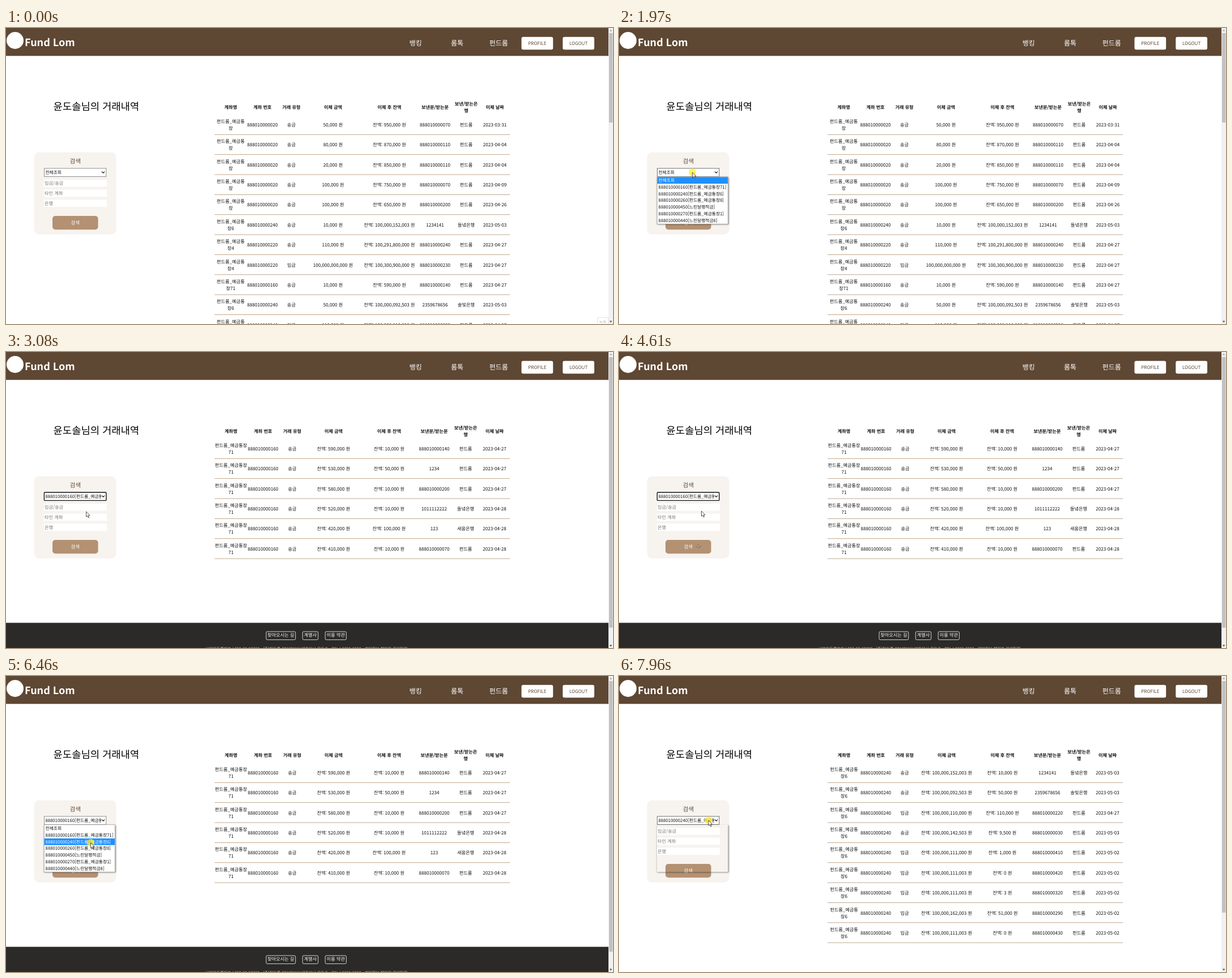
Write an HTML page that moves like this. It is 1071x523 px and loops after 7990 ms.

```html
<!DOCTYPE html>
<html lang="ko">
<head>
<meta charset="utf-8">
<title>거래내역</title>
<style>
html, body { margin: 0; width: 100%; height: 100%; overflow: hidden; background: #fff; }
svg { display: block; width: 100%; height: 100%; }
text { font: 8.15px "Noto Sans CJK KR", "Noto Sans CJK", "Noto Sans", sans-serif; text-rendering: geometricPrecision; white-space: pre; }
</style>
</head>
<body>
<svg id="stage" viewBox="0 0 1071 523" xmlns="http://www.w3.org/2000/svg"></svg>
<script>
const LOOP = 7990;
const BROWN = '#5e4733', TAN = '#b39172';
const BRAND = '펀드롬', SAVINGS = '느린달팽적금';

// ---------- markup helpers ----------
const text = (x, y, s, { size = 8.15, fill = '#111', anchor = 'middle', weight = 400, more = '' } = {}) =>
  `<text x="${x}" y="${y}" text-anchor="${anchor}" fill="${fill}" style="font-size:${size}px;font-weight:${weight}" ${more}>${s}</text>`;
const rect = (x, y, w, h, fill, more = '') =>
  `<rect x="${x}" y="${y}" width="${w}" height="${h}" fill="${fill}" ${more}/>`;
const group = (id, body, more = '') => `<g id="${id}" ${more}>${body}</g>`;

// ---------- tables ----------
const HEADS = ['계좌명', '계좌 번호', '거래 유형', '이체 금액', '이체 후 잔액', '보낸분/받는분', '', '이체 날짜'];
const PITCH = 35.36;
const account = s => s.replace('@', '888010000');
const bank = s => s === '-' ? BRAND : s + '은행';

// Row: name ending, account, type, two amounts, other account, bank, date
const TABLES = [
  { cols: [396.5, 452.5, 503.5, 577, 676.5, 757, 812, 862.5], name: '_예금통', prefix: '', thumb: 158, rows: [
    '장 @020 송금 50,000 950,000 @070 - 03-31',
    '장 @020 송금 80,000 870,000 @110 - 04-04',
    '장 @020 송금 20,000 850,000 @110 - 04-04',
    '장 @020 송금 100,000 750,000 @070 - 04-09',
    '장 @020 송금 100,000 650,000 @200 - 04-26',
    '장6 @240 송금 10,000 100,000,152,003 1234141 들녘 05-03',
    '장4 @220 송금 110,000 100,291,800,000 @240 - 04-27',
    '장4 @220 입금 100,000,000,000 100,300,900,000 @230 - 04-27',
    '장71 @160 송금 10,000 590,000 @140 - 04-27',
    '장6 @240 송금 50,000 100,000,092,503 2359678656 솔빛 05-03',
    '장6 @240 입금 110,000 100,000,110,000 @220 - 04-27'] },
  { cols: [397, 453.5, 505, 578, 676, 755.5, 811, 862], name: '_예금통장', prefix: '잔액: ', thumb: 478, rows: [
    '71 @160 송금 590,000 10,000 @140 - 04-27',
    '71 @160 송금 530,000 50,000 1234 - 04-27',
    '71 @160 송금 580,000 10,000 @200 - 04-27',
    '71 @160 송금 520,000 10,000 1011112222 들녘 04-28',
    '71 @160 송금 420,000 100,000 123 새움 04-28',
    '71 @160 송금 410,000 10,000 @070 - 04-28'] },
  { cols: [397, 453, 504, 578, 676.5, 756, 811.5, 862], name: '_예금통', prefix: '잔액: ', thumb: 409, rows: [
    '장6 @240 송금 100,000,152,003 10,000 1234141 들녘 05-03',
    '장6 @240 송금 100,000,092,503 50,000 2359678656 솔빛 05-03',
    '장6 @240 입금 100,000,110,000 110,000 @220 - 04-27',
    '장6 @240 송금 100,000,142,503 9,500 @030 - 05-03',
    '장6 @240 입금 100,000,111,000 1,000 @410 - 05-02',
    '장6 @240 입금 100,000,111,003 0 @420 - 05-02',
    '장6 @240 입금 100,000,111,003 3 @320 - 05-02',
    '장6 @240 입금 100,000,162,003 51,000 @290 - 05-02',
    '장6 @240 입금 100,000,111,003 0 @430 - 05-02'] }
];

function tableMarkup({ cols, name, prefix, rows }) {
  const bold = { weight: 700 };
  const head = HEADS.map((h, i) => text(cols[i], 142.5, h, bold)).join('')
    + text(cols[6], 136.7, '보낸/받는은', bold) + text(cols[6], 148.7, '행', bold);
  return head + rows.map((row, i) => {
    const [end, own, type, first, second, other, bankName, date] = row.split(' ');
    const y = 174 + i * PITCH;
    const cells = ['', account(own), type, `${prefix}${first} 원`, `잔액: ${second} 원`,
      account(other), bank(bankName), '2023-' + date];
    return text(cols[0], y - 6, BRAND + name) + text(cols[0], y + 6, end)
      + cells.map((c, k) => c && text(cols[k], y, c)).join('')
      + rect(368, 187.9 + i * PITCH, 521, 0.8, TAN);
  }).join('');
}

// ---------- page parts ----------
const OPTIONS = ['전체조회', `888010000160[${BRAND}_예금통장71]`, `888010000240[${BRAND}_예금통장6]`,
  `888010000260[${BRAND}_예금통장8]`, `888010000450[${SAVINGS}]`,
  `888010000270[${BRAND}_예금통장1]`, `888010000440[${SAVINGS}8]`];
const MENU_TOP = 263.3, OPTION_H = 11.83;
const FIELDS = [['입금/송금', 268], ['타인 계좌', 285.8], ['은행', 303.6]];

function headerMarkup() {
  const nav = [['뱅킹', 722.7], ['롬톡', 796], [BRAND, 869.3]];
  const buttons = [['PROFILE', 909.5], ['LOGOUT', 982.3]];
  return rect(0, 0, 1063, 49.3, BROWN)
    + '<circle cx="16" cy="22" r="15" fill="#fff"/>'
    + text(33, 32, 'Fund Lom', { size: 18, fill: '#fff', anchor: 'start', weight: 700 })
    + nav.map(([s, x]) => text(x, 31, s, { size: 12, fill: '#fff', weight: 500 })).join('')
    + buttons.map(([s, x]) => rect(x, 15.8, 55.7, 22.4, '#fff', 'rx="3"')
      + text(x + 27.8, 30.2, s, { size: 8.1, fill: BROWN })).join('');
}

function panelMarkup() {
  const fields = FIELDS.map(([s, y]) => rect(67, y, 111, 12.4, '#fff')
    + text(68, y + 9.4, s, { fill: '#757575', anchor: 'start' })).join('');
  return rect(49.5, 219.5, 145, 145.3, '#f7f3ef', 'rx="9"')
    + text(122.3, 239, '검색', { size: 10.6, fill: BROWN, weight: 500 })
    + rect(67.4, 248, 109.4, 14.4, '#fff', 'id="select"')
    + text(69.4, 258, '', { size: 7.75, anchor: 'start', more: 'id="value" clip-path="url(#valueClip)"' })
    + '<path d="M169 253.7l2.5 2.5 2.5-2.5" fill="none" stroke="#111" stroke-width="1.2"/>'
    + fields
    + rect(82, 332, 80.5, 24.3, TAN, 'rx="5"')
    + text(122.3, 347, '검색', { size: 8.4, fill: '#fff' });
}

function menuMarkup() {
  const items = OPTIONS.map((s, i) =>
    text(69.6, MENU_TOP + i * OPTION_H + 8.6, s, { size: 7.75, anchor: 'start', more: 'class="option"' })).join('');
  const shadow = '<g clip-path="url(#outside)">'
    + rect(67.5, 264, 126, 83, '#000', 'opacity=".5" filter="url(#soft)"') + '</g>';
  return shadow + group('menuBody',
    rect(67.2, 262.8, 125, 83.4, '#fff', 'stroke="#8a8a8a" stroke-width=".6"')
    + rect(67.5, MENU_TOP, 124.4, OPTION_H, '#1e90ff', 'id="highlight"') + items);
}

function footerMarkup() {
  const links = [['찾아오시는 길', 459, 51.8], ['계열사', 523.3, 27.4], ['이용 약관', 563.2, 37.2]];
  return rect(0, 478.5, 1063, 45, '#2b2a29')
    + links.map(([s, x, w]) => rect(x, 494, w, 14.4, 'none', 'rx="2" stroke="#fff" stroke-width=".8"')
      + text(x + w / 2, 503.4, s, { fill: '#fff' })).join('')
    + text(530, 526.6, `사업자등록번호 | 000-00-00000   (주)${BRAND} COMPANY 대표이사 윤도솔   TEL | 0000-0000   개인정보 책임자 관리팀장`,
      { size: 7.1, fill: '#ddd' });
}

function scrollbarMarkup() {
  return rect(1063, 0, 8, 523, '#f1f1f1')
    + rect(1064, 9, 6.4, 0, '#c1c1c1', 'id="thumb"')
    + '<path d="M1064.8 5.6l2.3-2.8 2.3 2.8z" fill="#a3a3a3"/>'
    + '<path d="M1064.8 517.6l2.3 2.8 2.3-2.8z" fill="#505050"/>';
}

const HAND = 'M-1 .8Q0-.6 1 .8V4.2Q2-.0 3 4.5 4.2 3.6 4.7 5 6.2 4.6 6.2 6V8.2L5 11.2H-.6L-3.6 7Q-3.4 5.6-1 7Z';
const CURSORS = {
  arrow: '<path d="M0 0V9.3L2.1 7.4 3.7 10.9 5.1 10.2 3.6 6.9H6.6Z" fill="#fff" stroke="#111" stroke-width=".7"/>',
  beam: '<path d="M-1.8-3.8H-.5L0-3.4 .5-3.8H1.8M0-3.4V4.2M-1.8 4.6H-.5L0 4.2 .5 4.6H1.8" fill="none" stroke="#222" stroke-width=".8"/>',
  hand: `<path d="${HAND}" fill="#fff" stroke="#111" stroke-width=".7"/>`
};

const stage = document.getElementById('stage');
stage.innerHTML = `<defs>
  <clipPath id="valueClip"><rect x="68" y="249" width="99.8" height="13"/></clipPath>
  <clipPath id="outside"><path clip-rule="evenodd" d="M0 0H1071V523H0ZM67 262.6H192.3V346.3H67Z"/></clipPath>
  <filter id="soft" x="-10%" y="-10%" width="120%" height="120%"><feGaussianBlur stdDeviation="1.4"/></filter>
</defs>`
  + rect(0, 0, 1071, 523, '#fff')
  + headerMarkup()
  + text(83.6, 145.2, '윤도솔님의 거래내역', { size: 17.7, anchor: 'start', fill: '#000' })
  + panelMarkup()
  + TABLES.map((t, i) => group('table' + i, tableMarkup(t))).join('')
  + group('footer', footerMarkup())
  + scrollbarMarkup()
  + group('tip', rect(1043.5, 511.5, 19, 13, '#fff', 'stroke="#ddd" stroke-width=".8"')
    + text(1053, 521.6, '녹화', { size: 7, fill: '#bbb' }))
  + group('menu', menuMarkup())
  + '<path id="trail" d="M136 343l3 3M138.500 339.500l2.500 2M141 346.500l1.500-3 2.500 0" fill="none" stroke="#776a60" stroke-width="1"/>'
  + '<circle id="click" r="6.7" fill="#ffee30" opacity=".75"/>'
  + group('cursor', Object.entries(CURSORS).map(([id, s]) => group(id, s)).join(''));

// ---------- timing ----------
const $ = id => document.getElementById(id);
const show = (id, on) => $(id).setAttribute('display', on ? 'inline' : 'none');
const within = (t, spans) => spans.some(([a, b]) => t >= a && t < b);

const PATH = [
  [410, 1028, 501], [560, 890, 430], [800, 400, 235], [960, 165, 168], [1070, 118, 157], [1200, 106, 197],
  [1670, 129.5, 255], [2250, 129.5, 255], [2450, 141, 281], [2590, 141, 281], [2620, 141.5, 282],
  [3370, 141.5, 282], [3560, 147, 306], [3840, 139, 340], [4420, 139, 340], [4610, 145.5, 281],
  [5040, 149.5, 259], [5949, 149.5, 259], [5950, 150, 270], [6310, 149.5, 294.5],
  [7250, 149.5, 295.5], [7750, 158, 255], [LOOP, 158, 255]
];
const CLICKS = [[1970, 2050], [2870, 3010], [5540, 5620], [6460, 6520], [7910, LOOP]];
const MENUS = [[1970, 3010], [5580, 6520], [7960, LOOP]];

function cursorAt(t) {
  const i = PATH.findIndex(([time]) => time > t);
  if (i < 1) return PATH[0].slice(1);
  const [t0, x0, y0] = PATH[i - 1], [t1, x1, y1] = PATH[i];
  const k = (t - t0) / (t1 - t0);
  return [x0 + (x1 - x0) * k, y0 + (y1 - y0) * k];
}

function cursorKind(x, y, menuOpen) {
  if (menuOpen) return 'arrow';
  if (x > 67 && x < 178 && FIELDS.some(([, top]) => y >= top && y <= top + 12.4)) return 'beam';
  if (x > 82 && x < 162.5 && y > 332 && y < 356) return 'hand';
  return 'arrow';
}

function render(t) {
  const [x, y] = cursorAt(t);
  const menuOpen = within(t, MENUS);
  const selected = t < 3010 ? 0 : t < 6520 ? 1 : 2;
  const table = t < 3050 ? 0 : t < 6560 ? 1 : 2;

  TABLES.forEach((_, i) => show('table' + i, i === table));
  show('footer', table === 1);
  $('thumb').setAttribute('height', TABLES[table].thumb);

  const focused = selected > 0 && !menuOpen;
  const hovered = y > 248 && y < 262.5 && x < 177;
  $('value').textContent = OPTIONS[selected];
  $('select').setAttribute('stroke', focused ? '#101010' : hovered ? '#4f4f4f' : '#767676');
  $('select').setAttribute('stroke-width', focused ? 1.4 : 0.8);
  $('select').setAttribute('rx', focused ? 1.2 : 0);

  show('menu', menuOpen);
  show('menuBody', t < 7960);
  const active = y < MENU_TOP ? selected : Math.min(6, Math.floor((y - MENU_TOP) / OPTION_H));
  $('highlight').setAttribute('y', MENU_TOP + active * OPTION_H);
  stage.querySelectorAll('.option').forEach((el, i) => el.setAttribute('fill', i === active ? '#fff' : '#111'));

  show('tip', t < 40);
  show('trail', t >= 4460 && t < 5040);
  show('click', within(t, CLICKS));
  $('click').setAttribute('cx', x);
  $('click').setAttribute('cy', y);
  show('cursor', t >= 410);
  $('cursor').setAttribute('transform', `translate(${x} ${y})`);
  const kind = cursorKind(x, y, menuOpen);
  Object.keys(CURSORS).forEach(id => show(id, id === kind));
}

const start = performance.now();
function tick() {
  render((performance.now() - start) % LOOP);
  requestAnimationFrame(tick);
}
tick();
</script>
</body>
</html>
```
